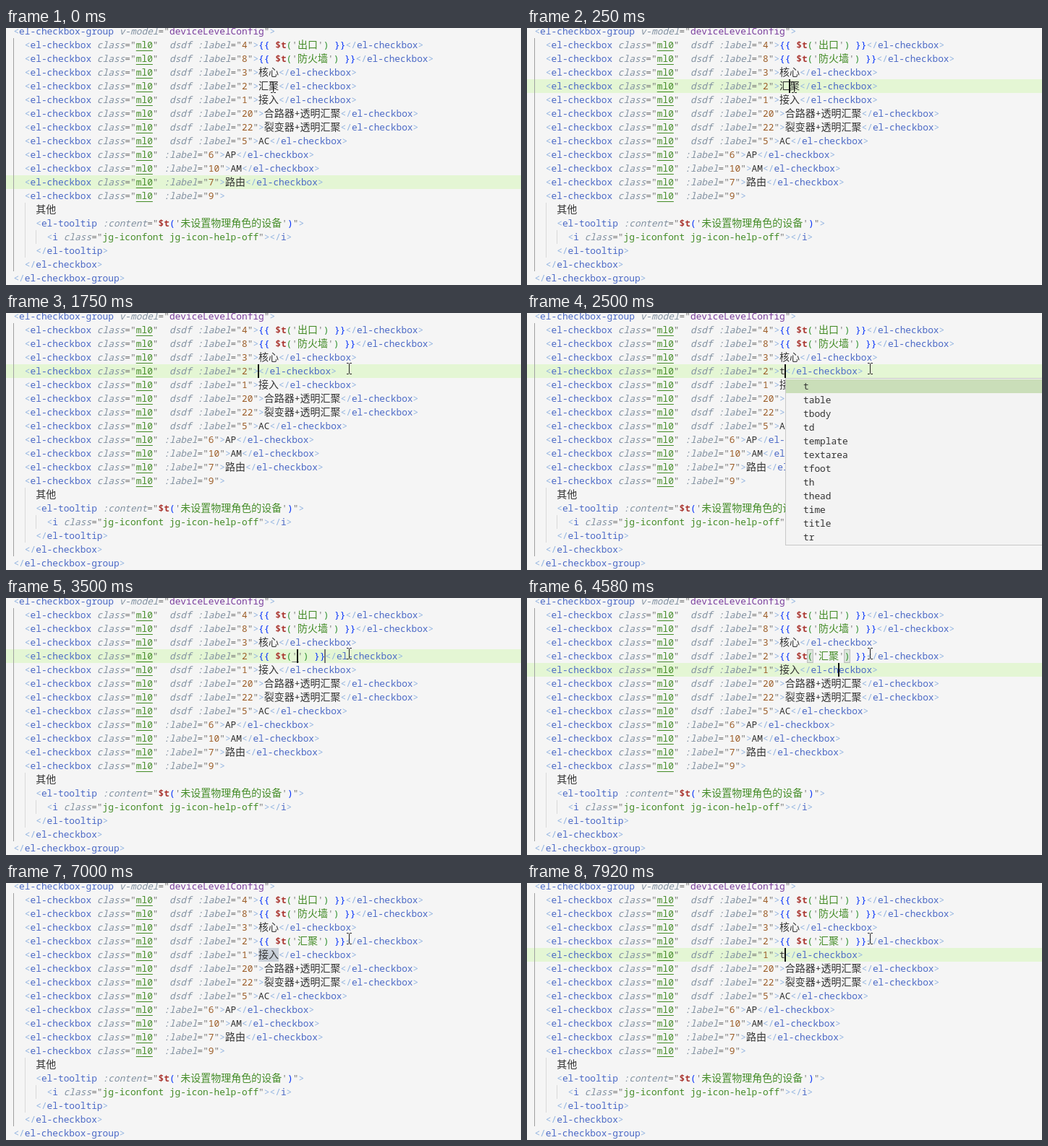
These frames come from a looping animation (712x356 px, 8 s). An HTML page:

```html
<!DOCTYPE html>
<html lang="zh">
<head>
<meta charset="utf-8">
<title>Code editor</title>
<style>
  html, body { margin: 0; width: 100%; height: 100%; overflow: hidden; background: #f5f5f5; }
  svg { display: block; width: 712px; height: 356px; }
  text { white-space: pre; font: 12.83px "Noto Sans Mono", "DejaVu Sans Mono", monospace; fill: #333; }
  text.cjk { font: 14px "Noto Sans CJK SC", "Noto Sans CJK", sans-serif; }
  .punct { fill: #91b3e0; }
  .tag { fill: #4b69c6; }
  .attr { fill: #8190a0; font-style: italic; }
  .quote { fill: #777; }
  .str { fill: #448c27; }
  .num { fill: #9c5d27; }
  .var { fill: #7a3e9d; }
  .fn { fill: #aa3731; font-weight: bold; }
  .brace { fill: #0431fa; }
  .paren { fill: #319331; }
</style>
</head>
<body>
<svg id="stage" viewBox="0 0 712 356"></svg>
<script>
const LOOP = 8000, LEFT = 10.4, CHAR = 7.698, WIDE = 14, LINE = 19;
const TEXT_X = LEFT + 44 * CHAR; // where a one-digit checkbox's label begins
const CJK = /[\u3400-\u9fff]/;
const stage = document.getElementById('stage');

function add(parent, name, attrs, text) {
  const el = document.createElementNS('http://www.w3.org/2000/svg', name);
  for (const key in attrs) el.setAttribute(key, attrs[key]);
  if (text) el.textContent = text;
  parent.appendChild(el);
  return el;
}
const rect = (x, y, width, height, fill) => add(stage, 'rect', { x, y, width, height, fill });
const show = (el, on) => el.setAttribute('visibility', on ? 'visible' : 'hidden');
const rowTop = row => row * LINE - 5;
const between = (t, a, b) => t >= a && t < b;

// Token builders: each returns a list of [text, class].
const open = name => [['<', 'punct'], [name, 'tag']];
const close = name => [['</', 'punct'], [name, 'tag'], ['>', 'punct']];
const end = [['>', 'punct']];
const attr = (name, value) =>
  [[name, 'attr'], ['=', 'quote'], ['"', 'quote'], ...value, ['"', 'quote']];
const call = (word, bracket) => [['$t', 'fn'], ['(', bracket], ["'", 'quote'],
  [word, 'str'], ["'", 'quote'], [')', bracket]];
const mustache = word =>
  [['{{ ', 'brace'], ...call(word, 'paren'), [' }}', 'brace']];
const plain = word => [[word, '']];

const checkbox = (label, body, marked) => [
  ...open('el-checkbox'), [' ', ''], ...attr('class', [['ml0', 'str']]),
  ...(marked ? [['  ', ''], ['dsdf', 'attr']] : []), [' ', ''],
  ...attr(':label', [[label, 'num']]), ...end,
  ...(body ? [...body, ...close('el-checkbox')] : [])
];

function drawLine(group, row, indent, tokens) {
  let x = LEFT + indent * CHAR;
  const y = rowTop(row) + 14;
  group.replaceChildren();
  for (const [token, kind] of tokens) {
    for (const part of token.match(/[\u3400-\u9fff]+|[^\u3400-\u9fff]+/g) || []) {
      const wide = CJK.test(part);
      add(group, 'text', { x, y, class: kind + (wide ? ' cjk' : '') }, part);
      const width = part.length * (wide ? WIDE : CHAR);
      if (part === 'ml0')
        add(group, 'rect', { x, y: y + 3, width, height: 1, class: 'str' });
      x += width;
    }
  }
}

const lineMark = rect(0, 0, 712, LINE, '#e4f6d4');
const selection = rect(TEXT_X, 0, 2 * WIDE, LINE, '#c9d0d9');
const matches = [6, 7].map(row =>
  rect(TEXT_X + 2 * CHAR + 5 * WIDE, rowTop(row), 2 * WIDE, LINE, '#dfe3e7'));
matches.forEach(el => el.setAttribute('x', TEXT_X + 2 * CHAR + 5 * WIDE));

// Indent guides: column, first row, last row, colour.
for (const [col, first, last, fill] of
  [[0, 1, 17, '#a0a0a0'], [2, 13, 16, '#d9d9d9'], [4, 15, 15, '#d9d9d9']])
  rect(Math.round(LEFT + col * CHAR), rowTop(first), 1, (last - first + 1) * LINE, fill);

const lines = [
  [0, [...open('el-checkbox-group'), [' ', ''],
    ...attr('v-model', [['deviceLevelConfig', 'var']]), ...end]],
  [2, checkbox('4', mustache('出口'), true)],
  [2, checkbox('8', mustache('防火墙'), true)],
  [2, checkbox('3', plain('核心'), true)],
  [2, []],
  [2, []],
  [2, checkbox('20', plain('合路器+透明汇聚'), true)],
  [2, checkbox('22', plain('裂变器+透明汇聚'), true)],
  [2, checkbox('5', plain('AC'), true)],
  [2, checkbox('6', plain('AP'))],
  [2, checkbox('10', plain('AM'))],
  [2, checkbox('7', plain('路由'))],
  [2, checkbox('9')],
  [4, plain('其他')],
  [4, [...open('el-tooltip'), [' ', ''],
    ...attr(':content', call('未设置物理角色的设备', 'brace')), ...end]],
  [6, [...open('i'), [' ', ''],
    ...attr('class', [['jg-iconfont jg-icon-help-off', 'str']]), ...end, ...close('i')]],
  [4, close('el-tooltip')],
  [2, close('el-checkbox')],
  [0, close('el-checkbox-group')]
];
const groups = lines.map(([indent, tokens], row) => {
  const group = add(stage, 'g', {});
  drawLine(group, row, indent, tokens);
  return group;
});

const outline = (width, stroke, fill) => add(stage, 'rect',
  { y: rowTop(4) + 0.5, width, height: LINE - 1, fill, stroke });
const brackets = [0, 1].map(() => outline(CHAR, '#b9b9b9', 'rgba(0,100,0,.1)'));
const tabStop = outline(1, '#777', 'none');
const slot = rect(TEXT_X + 6 * CHAR, rowTop(4) + 17, CHAR + 2, 1, '#777');
const caret = rect(0, 0, 2, LINE, '#111');

function panel(x, y, width, height) {
  const group = add(stage, 'g', {});
  add(group, 'rect', { x: x + 0.5, y: y + 0.5, width: width - 1, height: height - 1,
    fill: '#f3f3f3', stroke: '#c8c8c8' });
  return group;
}

// Completion list below the caret, open while the shortcut is typed.
const suggest = panel(357, 90, 430, 232);
add(suggest, 'rect', { x: 358, y: 92, width: 428, height: LINE, fill: '#cadeb9' });
't table tbody td template textarea tfoot th thead time title tr'.split(' ').forEach((word, i) =>
  add(suggest, 'text', { x: 382, y: 106 + i * LINE }, word));

// Tag hint above the pointer.
const hint = panel(393, 14, 262, 57);
add(hint, 'text', { x: 402, y: 47, class: 'tag' }, '<el-checkbox>');

const mouse = add(stage, 'path', {
  d: 'M-3.5 -7.5h2.5l1 1l1 -1h2.5M0 -6.5V6.5M-3.5 7.5h2.5l1 -1l1 1h2.5',
  fill: 'none', stroke: '#222', 'stroke-width': 1
});

// Latest entry whose time has come.
const latest = (list, t) => list.reduce((now, step) => t >= step[0] ? step : now, list[0]);

const edits = {
  4: [[0, plain('汇聚')], [1670, plain('')], [2330, plain('t')],
    [3500, mustache('')], [4000, mustache('汇聚')]],
  5: [[0, plain('接入')], [7330, plain('')], [7920, plain('t')]]
};
const marks = [[0, 11], [170, 4], [420, -2], [1670, 4], [4580, 5], [6500, -2], [7330, 5]];

// Caret stops: time, row, x (a negative row hides it).
const inQuotes = TEXT_X + 7 * CHAR;
const afterWord = TEXT_X + 2 * WIDE;
const carets = [
  [0, -2, 0], [170, 4, TEXT_X + WIDE], [420, 4, afterWord], [920, -2, 0],
  [1420, 4, afterWord], [1670, 4, TEXT_X], [2250, -2, 0], [2330, 4, TEXT_X + CHAR],
  [2830, -2, 0], [3330, 4, TEXT_X + CHAR], [3500, 4, inQuotes],
  [4000, 4, inQuotes + 2 * WIDE], [4580, 5, afterWord + 7 * CHAR],
  ...[4750, 4920, 5080, 5250, 5420, 5580, 5750].map((t, i) => [t, 5, afterWord + (6 - i) * CHAR]),
  [5920, 5, TEXT_X + WIDE], [6330, 5, afterWord], [6500, 5, TEXT_X],
  [7000, -2, 0], [7330, 5, TEXT_X], [7920, 5, TEXT_X + CHAR]
];

const drawn = {};
function render(t) {
  for (const row in edits) {
    const step = latest(edits[row], t);
    if (drawn[row] === step) continue;
    drawn[row] = step;
    drawLine(groups[row], +row, 2, checkbox(row === '4' ? '2' : '1', step[1], true));
  }

  lineMark.setAttribute('y', rowTop(latest(marks, t)[1]));
  const picked = between(t, 420, 1670);
  show(selection, picked || between(t, 6500, 7330));
  selection.setAttribute('y', rowTop(picked ? 4 : 5));
  matches.forEach(el => show(el, picked));

  const [, row, x] = latest(carets, t);
  caret.setAttribute('x', Math.round(x) - 1);
  caret.setAttribute('y', rowTop(row));
  show(caret, row >= 0);

  const filled = t >= 4000 ? 2 * WIDE : 0;
  const inside = between(t, 3580, 4000) || between(t, 4080, 4670);
  brackets[0].setAttribute('x', TEXT_X + 5 * CHAR);
  brackets[1].setAttribute('x', TEXT_X + 8 * CHAR + filled);
  brackets.forEach(el => show(el, inside));
  tabStop.setAttribute('x', Math.round(TEXT_X + 12 * CHAR + filled) - 0.5);
  show(tabStop, between(t, 3500, 4580));
  show(slot, between(t, 3500, 4000));

  show(suggest, between(t, 2500, 3500));
  show(hint, between(t, 1250, 1670));
  hint.setAttribute('opacity', Math.min(1, Math.max(0, (t - 1170) / 250)));

  // The pointer travels in five hops.
  const hop = Math.max(0, Math.min(5, Math.floor((t - 670) / 82.5) + 1)) / 5;
  const ease = hop * hop * (3 - 2 * hop);
  const px = Math.round(369 + 105 * ease) + 0.5;
  const py = 82 - 5 * ease - 3 * Math.sin(Math.PI * ease);
  mouse.setAttribute('transform', `translate(${px} ${Math.round(py)})`);
}

const start = performance.now();
function tick() {
  render((performance.now() - start) % LOOP);
  requestAnimationFrame(tick);
}
tick();
</script>
</body>
</html>
```
